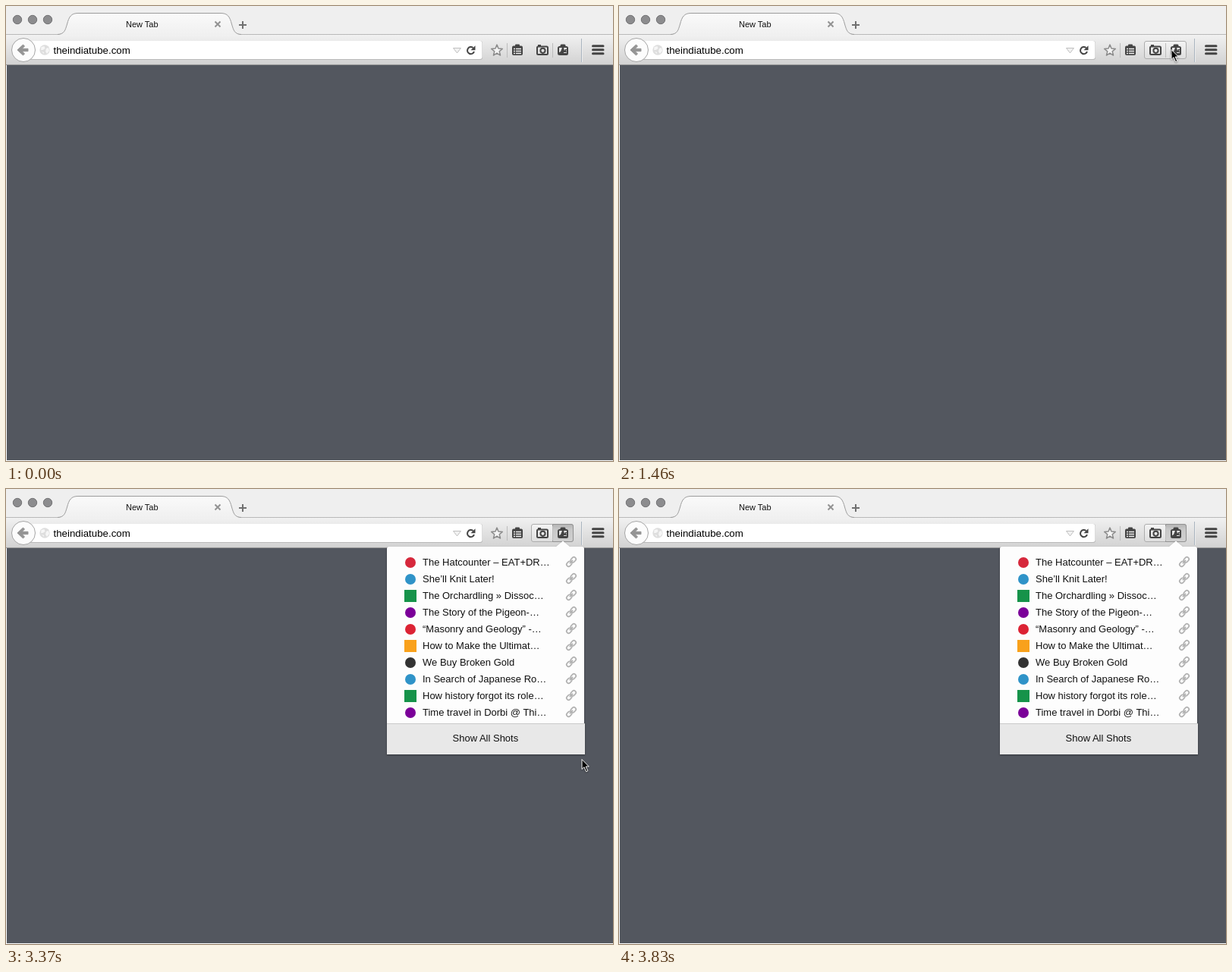
Write an HTML page that moves like this. It is 800 px wide and 600 px high and loops after 4380 ms.

```html
<!DOCTYPE html>
<html lang="en">
<head>
<meta charset="utf-8">
<title>Browser shots menu</title>
<style>
  html, body { margin: 0; width: 100%; height: 100%; overflow: hidden; background: #fff; }
  svg { display: block; width: 100%; height: 100%; }
  text { font: 13px "Liberation Sans", Arial, sans-serif; fill: #111; }
  .tab-title { font-size: 11px; }
  .url { font-size: 13.3px; fill: #000; }
  .line { fill: none; stroke: #444; stroke-width: 2; }
  .dark { fill: #444; }
  #cursor { filter: drop-shadow(0 1px 1px rgba(0, 0, 0, .4)); }
  #panel { filter: drop-shadow(0 1px 1px rgba(0, 0, 0, .4)); }
</style>
</head>
<body>
<svg viewBox="0 0 800 600" xmlns="http://www.w3.org/2000/svg">
  <defs>
    <linearGradient id="bar" x2="0" y2="1">
      <stop stop-color="#f1f1f1"/><stop offset="1" stop-color="#d2d2d2"/>
    </linearGradient>
    <linearGradient id="tab" x2="0" y2="1">
      <stop stop-color="#fafafa"/><stop offset="1" stop-color="#f0f0f0"/>
    </linearGradient>
    <linearGradient id="button" x2="0" y2="1">
      <stop stop-color="#f4f4f4"/><stop offset="1" stop-color="#dedede"/>
    </linearGradient>
    <linearGradient id="down" x2="0" y2="1">
      <stop stop-color="#b4b4b4"/><stop offset=".3" stop-color="#c8c8c8"/><stop offset="1" stop-color="#d0d0d0"/>
    </linearGradient>
    <g id="link" fill="none" stroke="#b2b2b2" stroke-width="1.7" transform="rotate(-45)">
      <rect x="-7.6" y="-2.7" width="7.4" height="5.4" rx="2.7"/>
      <rect x=".2" y="-2.7" width="7.4" height="5.4" rx="2.7"/>
      <path d="M-3 0H3"/>
    </g>
  </defs>

  <!-- Window and tab strip -->
  <rect width="800" height="600" fill="#fff"/>
  <rect x="1" y="78" width="799" height="521" fill="#53575f"/>
  <rect width="800" height="38" fill="#efefef"/>
  <rect y="38" width="800" height="39" fill="url(#bar)"/>
  <path d="M0 37.5H800" stroke="#b9b9b9"/>
  <path d="M0 77.5H800" stroke="#999"/>
  <g fill="#8c8c8e" stroke="#737375">
    <circle cx="15" cy="18" r="5.7"/><circle cx="35" cy="18" r="5.7"/><circle cx="55" cy="18" r="5.7"/>
  </g>
  <path d="M68 38C77 37 78 32 80.500 24C83 14 86 9.500 95 9.500H283C292 9.500 295 14 297.500 24C300 32 301 37 310 38Z" fill="url(#tab)"/>
  <path d="M68 37.500C77 37 78 32 80.500 24C83 14 86 9.500 95 9.500H283C292 9.500 295 14 297.500 24C300 32 301 37 310 37.500" fill="none" stroke="#9c9c9c"/>
  <text class="tab-title" x="158" y="28">New Tab</text>
  <path d="M275.500 20.500l7 7m0-7l-7 7" stroke="#929292" stroke-width="2"/>
  <path d="M307 25h10m-5-5v10" stroke="#707070" stroke-width="2"/>

  <!-- Address bar -->
  <rect x="30" y="46" width="598" height="25" rx="3" fill="#b9b9b9"/>
  <rect x="30" y="46" width="597.500" height="24" rx="3" fill="#fff"/>
  <circle cx="23" cy="58" r="15.500" fill="#fcfcfc" stroke="#a5a5a5"/>
  <path d="M15 58l7.500-7 2 2-3.200 3.300H29v3.400H21.300L24.500 63l-2 2z" fill="#949494" stroke="#949494" stroke-linejoin="round"/>
  <circle cx="51" cy="58" r="6.700" fill="#dedede"/>
  <path d="M46.500 54l4-1 1 3-3 2-2.500 0zM53 56l3-1 1 4-3 4-2-3zM47 60l3 1v2z" fill="#f6f6f6"/>
  <text class="url" x="62.500" y="63">theindiatube.com</text>
  <path d="M589.500 55.500h10l-5 6.500z" fill="#f2f2f2" stroke="#c0c0c0"/>
  <path class="line" d="M617 60.200A4.600 4.600 0 1 1 615.500 55"/>
  <path class="dark" d="M618.500 52.300v6h-6z"/>

  <!-- Toolbar buttons -->
  <g id="hover">
    <rect x="692.500" y="46.500" width="55" height="23" rx="2.500" fill="url(#button)" stroke="#acacac"/>
  </g>
  <g id="pressed">
    <path d="M720.500 46.500H745a2.500 2.500 0 0 1 2.500 2.500V67a2.500 2.500 0 0 1-2.500 2.500H720.500z" fill="url(#down)" stroke="#929292"/>
  </g>
  <path d="M660.500 49v19M720.500 49v19" stroke="#bcbcbc"/>
  <path d="M758.500 43v31" stroke="#a9b4bf"/>
  <path d="M759.500 43v31" stroke="#eee"/>
  <path id="star" fill="#f4f4f4" stroke="#8b8b8b" stroke-width="1.500" stroke-linejoin="round"/>
  <rect class="dark" x="667" y="52.500" width="14" height="12.500" rx="2"/>
  <rect class="dark" x="671" y="50.500" width="6" height="4" rx="1"/>
  <path d="M669 56.500h2m1 0h7M669 59.500h2m1 0h7M669 62.500h2m1 0h7" stroke="#eee" stroke-width="1.500"/>
  <rect class="line" x="700" y="53.500" width="14" height="10.500" rx="1.500"/>
  <path class="dark" d="M701 51h4v2h-4z"/>
  <circle class="line" cx="707.500" cy="58.800" r="3.100"/>
  <rect x="728" y="54" width="12" height="10" rx="1.500" fill="#e6e6e6" stroke="#444" stroke-width="2"/>
  <rect class="dark" x="730.500" y="50.500" width="7" height="4.500" rx="1.500"/>
  <path class="dark" d="M728 62l3-2 2-5h2l1 4 1-2h2l-1 3h2v4H728z"/>
  <path d="M735 61.500h4" stroke="#e6e6e6"/>
  <path d="M773.500 52.700h13.500m-13.500 5h13.500m-13.500 5h13.500" stroke="#444" stroke-width="3" stroke-linecap="round"/>

  <!-- Shots menu -->
  <g id="panel">
    <path d="M502 309V79a3 3 0 0 1 3-3H725l9-7.500 9 7.500H759a3 3 0 0 1 3 3V309z" fill="#fdfdfd"/>
    <rect x="502" y="309" width="261" height="41" fill="#e8e8e8"/>
    <path d="M502 309.500H763" stroke="#cacaca"/>
    <g id="rows"></g>
    <text x="588.500" y="333">Show All Shots</text>
  </g>

  <g id="cursor">
    <path d="M1 1.500V14.500L4 11.700L6.600 17.700L8.800 16.700L6.200 11H10.300Z" stroke="#fff"/>
  </g>
</svg>
<script>
const LOOP = 4380, OPEN_AT = 2350, HOVER_Y = 44;
const find = id => document.getElementById(id);
const make = (name, attrs, parent) => {
  const node = document.createElementNS("http://www.w3.org/2000/svg", name);
  for (const key in attrs) node.setAttribute(key, attrs[key]);
  return parent.appendChild(node);
};

const shots = [
  ["circle", "#d6283c", "The Hatcounter – EAT+DR…"],
  ["circle", "#2f93c8", "She’ll Knit Later!"],
  ["square", "#16934a", "The Orchardling » Dissoc…"],
  ["circle", "#7b0099", "The Story of the Pigeon-…"],
  ["circle", "#dc2334", "“Masonry and Geology” -…"],
  ["square", "#f9a11b", "How to Make the Ultimat…"],
  ["circle", "#333333", "We Buy Broken Gold"],
  ["circle", "#2f93c8", "In Search of Japanese Ro…"],
  ["square", "#16934a", "How history forgot its role…"],
  ["circle", "#7b0099", "Time travel in Dorbi @ Thi…"]
];
shots.forEach(([shape, fill, title], i) => {
  const y = 97 + 22 * i, rows = find("rows");
  if (shape === "circle") make("circle", { cx: 533, cy: y, r: 7, fill }, rows);
  else make("rect", { x: 525, y: y - 8, width: 16, height: 16, fill }, rows);
  make("text", { x: 549, y: y + 4 }, rows).textContent = title;
  make("use", { href: "#link", x: 0, y: 0, transform: `translate(745 ${y - 1})` }, rows);
});

const starPoints = Array.from({ length: 10 }, (_, i) => {
  const angle = i * Math.PI / 5 - Math.PI / 2, r = i % 2 ? 3.4 : 7.7;
  return `${647 + r * Math.cos(angle)} ${58.8 + r * Math.sin(angle)}`;
});
find("star").setAttribute("d", `M${starPoints.join("L")}Z`);

// Pointer positions: time, x, y. Each holds until the next.
const path = [
  [0, 725, -40], [840, 725, -17], [930, 725, -6], [990, 725, 8], [1050, 725, 22],
  [1110, 725, 34], [1170, 726, 43], [1220, 726, 49], [1280, 726, 52], [1340, 726, 54],
  [1400, 727, 55], [1460, 727, 56]
];
const ease = p => p * p * p * (10 + p * (6 * p - 15));
for (let i = 1; i <= 9; i++) {
  const p = ease(i / 9);
  path.push([3130 + Math.round((i - 1) * 5.875) * 10, Math.round(727 + 52 * p), Math.round(56 + 495 * p)]);
}
path.push([3660, 780, 560], [3720, 782, 573], [3770, 784, 588], [3830, 786, 620]);

const show = (id, on) => find(id).setAttribute("visibility", on ? "visible" : "hidden");
const start = performance.now();
function draw() {
  const t = (performance.now() - start) % LOOP;
  const [, x, y] = path.findLast(step => step[0] <= t);
  find("cursor").setAttribute("transform", `translate(${x} ${y})`);
  show("hover", t >= OPEN_AT || y >= HOVER_Y);
  show("pressed", t >= OPEN_AT);
  show("panel", t >= OPEN_AT);
  requestAnimationFrame(draw);
}
draw();
</script>
</body>
</html>
```
